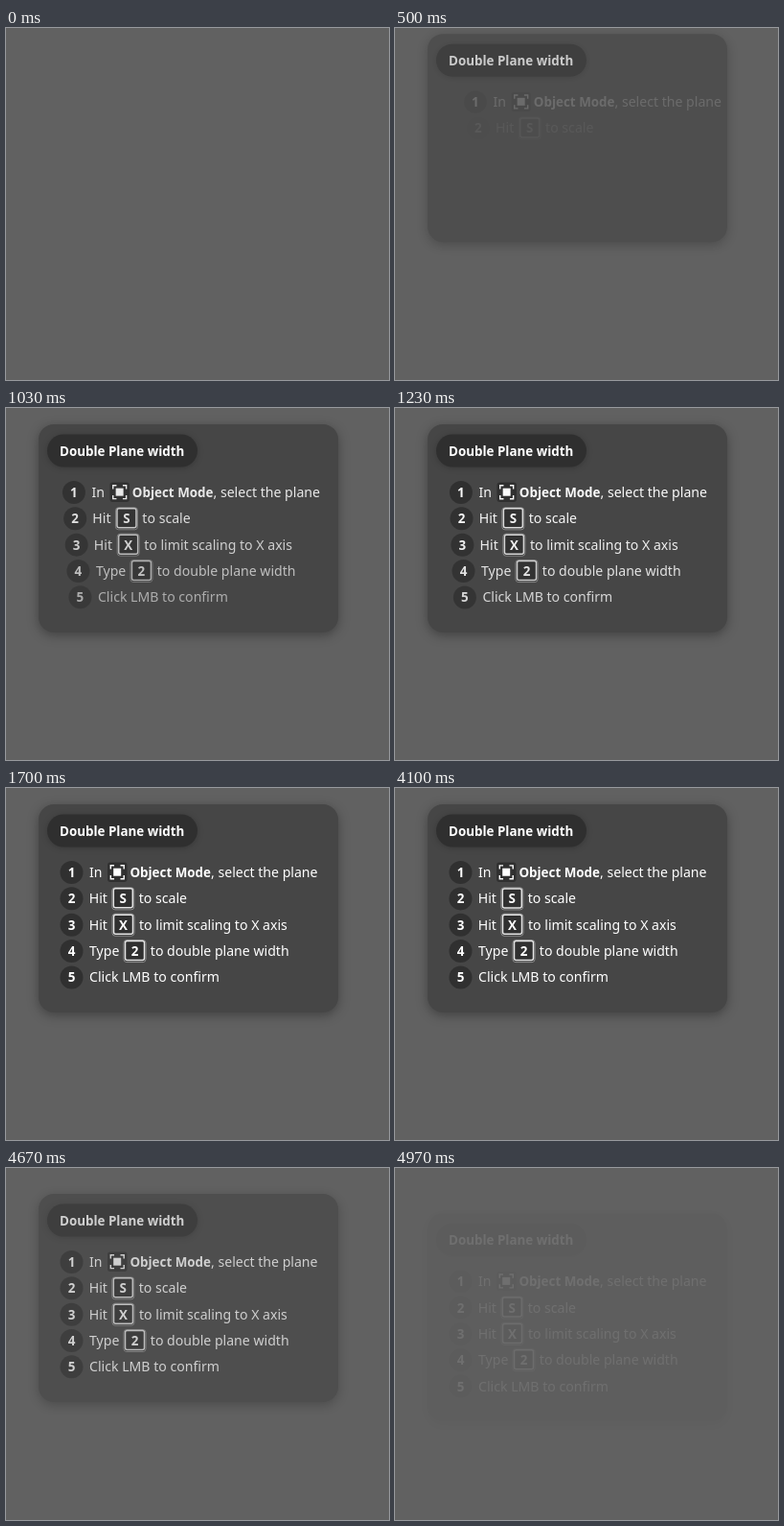
An HTML page for the animation above (5010 ms loop, 400 px wide and 367 px high).

```html
<!DOCTYPE html>
<html lang="en">
<head>
<meta charset="utf-8">
<title>Double Plane width</title>
<style>
  html, body { margin: 0; width: 100%; height: 100%; overflow: hidden; background: #616161; }
  svg { display: block; width: 100%; height: 100%; }
  text { font: 14.1px "Noto Sans", "Open Sans", sans-serif; fill: #fff; white-space: pre; }
  .bold { font-weight: 700; font-size: 13.4px; }
  .mid { text-anchor: middle; }
  .panel { fill: #464646; filter: drop-shadow(0 3px 6px rgba(0, 0, 0, .32)); }
  .pill { fill: #2f2f2f; filter: drop-shadow(0 1px 3px rgba(0, 0, 0, .2)); }
  .dark { fill: #303030; }
  .rim { fill: #303030; stroke: #8c8c8c; }
  .key { fill: #303030; stroke: #e4e4e4; stroke-width: 1.5; }
  .corners { fill: none; stroke: #fff; stroke-width: 1.4; }
</style>
</head>
<body>
<svg viewBox="0 0 400 367">
  <g id="card">
    <rect class="panel" x="34" y="17" width="313" height="217" rx="16"/>
    <rect class="pill" x="43" y="27.5" width="157" height="34" rx="17"/>
    <text class="bold" x="56" y="50">Double Plane width</text>
    <g id="rows"></g>
  </g>
</svg>
<script>
const LOOP = 5010;
const card = document.getElementById('card');
const rowBox = document.getElementById('rows');

const label = (x, text, cls = '') => `<text class="${cls}" x="${x}" y="5">${text}</text>`;

const keycap = (x, char) => `
  <rect class="rim" x="${x - 11.5}" y="-11.5" width="23" height="23" rx="3"/>
  <rect class="key" x="${x - 10}" y="-10.5" width="20" height="20" rx="2"/>
  ${label(x, char, 'bold mid')}`;

const modeIcon = `
  <rect class="dark" x="106" y="-10.5" width="20.5" height="20.5" rx="3"/>
  <path class="corners" d="M109.3-3.5v-3.7h3.7M119.5-7.2h3.7v3.7M123.2 3v3.7h-3.7M113 6.7h-3.7V3"/>
  <rect x="112.2" y="-4.3" width="8" height="8" fill="#fff"/>`;

const steps = [
  label(87, 'In') + modeIcon + label(129.4, 'Object Mode', 'bold') + label(214, ', select the plane'),
  label(86.7, 'Hit') + keycap(122.3, 'S') + label(138.7, 'to scale'),
  label(86.7, 'Hit') + keycap(122.5, 'X') + label(139, 'to limit scaling to X axis'),
  label(87, 'Type') + keycap(134.5, '2') + label(150.8, 'to double plane width'),
  label(87, 'Click LMB to confirm')
];
rowBox.innerHTML = steps.map((step, i) =>
  `<g><circle class="dark" cx="68.5" r="12"/>${label(68.5, i + 1, 'bold mid')}${step}</g>`).join('');
const rows = [...rowBox.children];

// Progress of a one-second move that begins at the given time
const progress = (time, start) => Math.min(1, Math.max(0, (time - start) / 1000));
const easeOut = u => 1 - (1 - u) ** 2;

function place(node, x, y, opacity) {
  node.setAttribute('transform', `translate(${x} ${y})`);
  node.setAttribute('opacity', opacity);
}

function draw(now) {
  const time = now % LOOP;
  const enter = easeOut(progress(time, 75));
  const leave = progress(time, 4000) ** 3;
  place(card, 0, 33 * (enter - 1 + leave), time < 100 ? 0 : enter * (1 - leave));
  rows.forEach((row, i) => {
    const shown = easeOut(progress(time, 380 + 80 * i));
    place(row, 20 * (1 - shown), 88 + 27.35 * i, shown);
  });
}

const begin = performance.now();
function tick() {
  draw(performance.now() - begin);
  requestAnimationFrame(tick);
}
tick();
</script>
</body>
</html>
```
